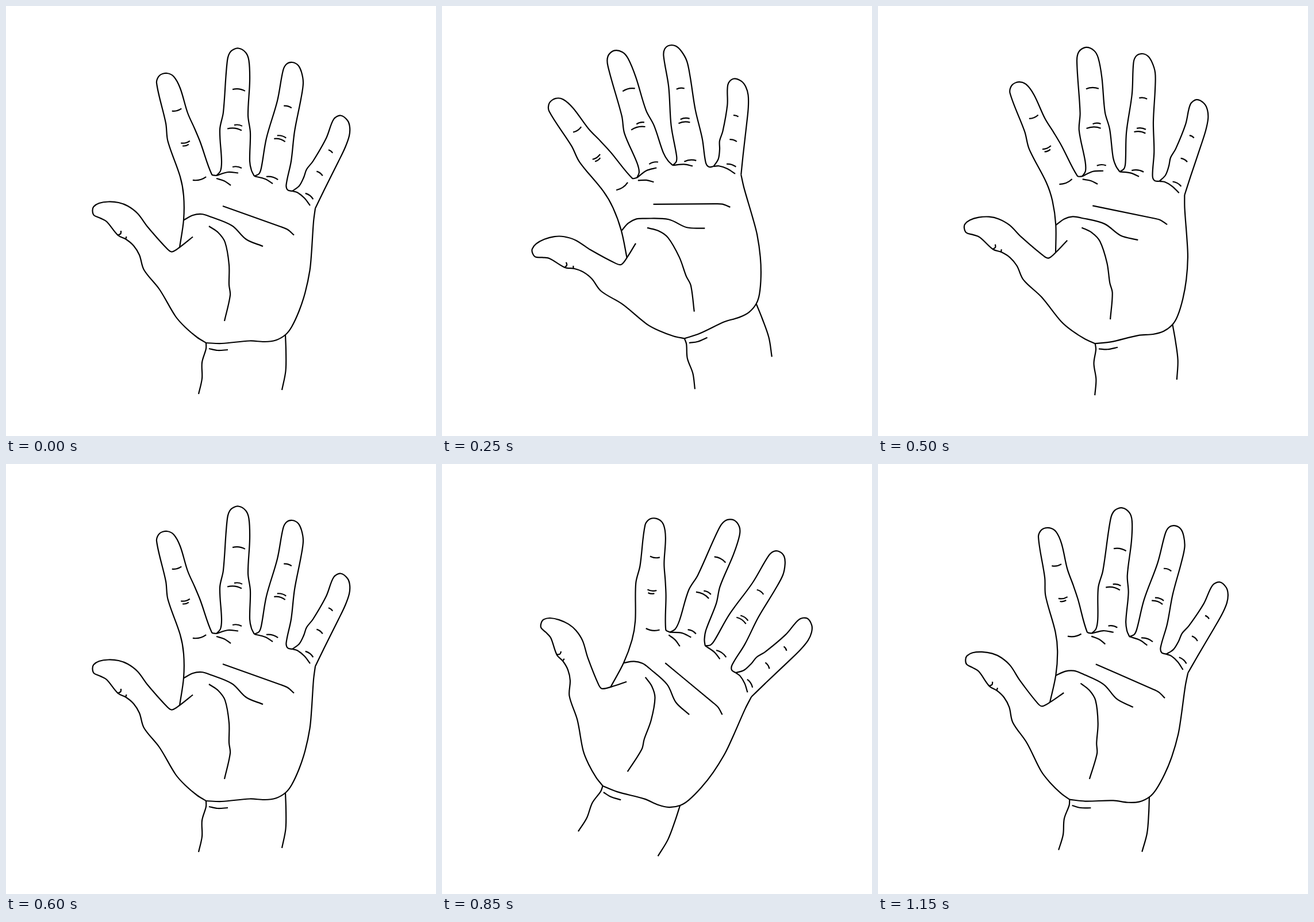
Write an HTML page that moves like this. It is 748 px wide and 748 px high and loops after 1.2 s.

```html
<!DOCTYPE html>
<html lang="en">
<head>
<meta charset="utf-8">
<title>Waving hand</title>
<style>
  html, body { margin: 0; width: 100%; height: 100%; overflow: hidden; background: #fff; }
  svg { display: block; width: 100%; height: 100%; }
  path { fill: none; stroke: #000; stroke-width: 2.2; stroke-linejoin: round; }
</style>
</head>
<body>
<svg viewBox="0 0 748 748"><g id="hand"></g></svg>
<script>
const hand = document.getElementById('hand');

// Key points; a smooth curve runs through each group
const lines = {
  thumb: `325,401.5 303,419 289,427.5 281,423 247,385 229,361 212,348 196,342 178,340.5 162,343
    152.5,349 150.5,356 153,364 164,369 175,375 195,399 209,406 222,417 232,433 240,459 267,493
    295,540 312,559 332,576 348,586`,
  heel: '348,586 375,587 424,582.5 450,584 469,581.5 486,572 497,558 510,530 520.5,498 528.5,460 531.5,428 535,375 538,352',
  little: `538,352 553,321 578,271 590,246 597,226 598,211 594,199 582,190.5 570,197 557,230
    534,270 523,284 518,298 510,313 498,322`,
  ring: `498,322 490,320 487.5,311 496,270 502,218 513,162 517,134 514,115 508,103 498,98 488,101
    482,112 472,165 453,230 444,282 440,292 432,296`,
  middle: `432,296 427,286 424,270 425,220 421,190 424,130 422.5,95 417,81 404,73.5 391,79 385,95
    378,185 372,215 375,270 373,287 366,295`,
  index: `366,295 358,293 338,237 328,213 316,186 303,143 292,123 280,117 267,121 262,134
    278,204 281.5,235 303,297 309,330 309,372 302,420`,
  wrist: '348,586 348,596 341,620 341,648 335,675',
  wristEdge: '486,572 487,600 486.5,635 480,668',
  wristFold: '353,596 368,599 386,598',
  heartLine: '377,348 478,384 490,389 501,398.5',
  headLine: '309,372.5 325,364 340,362 354,366 393,382 418,406 447,418',
  lifeLine: '353,383 369,394 381,411 388,450 388,485 390,503 380,548',
  thumbFolds: ['200,391 199.5,396 194,399', '209.5,401 208,406'],
  webFolds: ['366,300 380,304.5 391,312', '366,295 386,289 404,290.5',
    '432,296 451,301 464,309', '498,322 507,324.5 519,334 529,347']
};

// Joint creases: tilt of the finger in degrees, then middle point and length of each mark
const joints = [
  { tilt: -14, marks: [[297, 180.5, 17], [312, 236.5, 16], [312.5, 242, 11], [336.5, 300, 24]] },
  { tilt: 7, marks: [[405, 146.5, 22], [404, 208, 14], [397.5, 215, 25], [402, 281, 16]] },
  { tilt: 15, marks: [[490, 175.5, 14], [479.5, 227.5, 16], [476, 233.5, 20], [463, 299.5, 21]] },
  { tilt: 37, marks: [[564.5, 253, 9], [545.5, 291.5, 13], [527.5, 331, 17]] }
];

const parse = text => text.trim().split(/\s+/).map(s => s.split(',').map(Number));
const dist = (a, b) => Math.hypot(a[0] - b[0], a[1] - b[1]);

// Cubic Béziers whose handles follow the neighbours and scale with the segment
function curve(p) {
  const at = i => p[Math.max(0, Math.min(p.length - 1, i))];
  const handle = (i, size) => {
    const a = at(i - 1), b = at(i), c = at(i + 1);
    const span = dist(a, b) + dist(b, c);
    return b.map((v, k) => v + (c[k] - a[k]) / span * size / 3);
  };
  let d = 'M' + p[0];
  for (let i = 1; i < p.length; i++) {
    const size = dist(p[i - 1], p[i]);
    d += `C${handle(i - 1, size)} ${handle(i, -size)} ${p[i]}`;
  }
  return d;
}

function addPath(d) {
  const path = document.createElementNS('http://www.w3.org/2000/svg', 'path');
  path.setAttribute('d', d);
  hand.append(path);
}

function addMark(tilt, [x, y, length]) {
  const a = tilt * Math.PI / 180, bow = Math.sign(tilt) * length * 0.2;
  const dx = Math.cos(a) * length / 2, dy = Math.sin(a) * length / 2;
  addPath(`M${x - dx} ${y - dy}Q${x + Math.sin(a) * bow} ${y - Math.cos(a) * bow} ${x + dx} ${y + dy}`);
}

const shapes = Object.values(lines).flat().map(parse);
const points = shapes.flat();
shapes.forEach(p => addPath(curve(p)));
joints.forEach(({ tilt, marks }) => marks.forEach(m => addMark(tilt, m)));

// Each step turns the hand by 4 degrees about the centre of its current bounding box
function turn(pose, degrees) {
  const moved = points.map(([x, y]) => pose.transformPoint(new DOMPoint(x, y)));
  const centre = axis => {
    const v = moved.map(q => q[axis]);
    return (Math.min(...v) + Math.max(...v)) / 2;
  };
  const x = centre('x'), y = centre('y');
  return new DOMMatrix().translate(x, y).rotate(degrees).translate(-x, -y).multiply(pose);
}

function swing(degrees) {
  const poses = [new DOMMatrix()];
  while (poses.length < 7) poses.push(turn(poses.at(-1), degrees));
  return poses;
}

const left = swing(-4), right = swing(4);

function draw(now) {
  const step = Math.floor(now % 1200 / 50);
  const side = step < 12 ? left : right;
  const { a, b, c, d, e, f } = side[6 - Math.abs(step % 12 - 6)];
  hand.setAttribute('transform', `matrix(${[a, b, c, d, e, f]})`);
  requestAnimationFrame(draw);
}
draw(performance.now());
</script>
</body>
</html>
```
